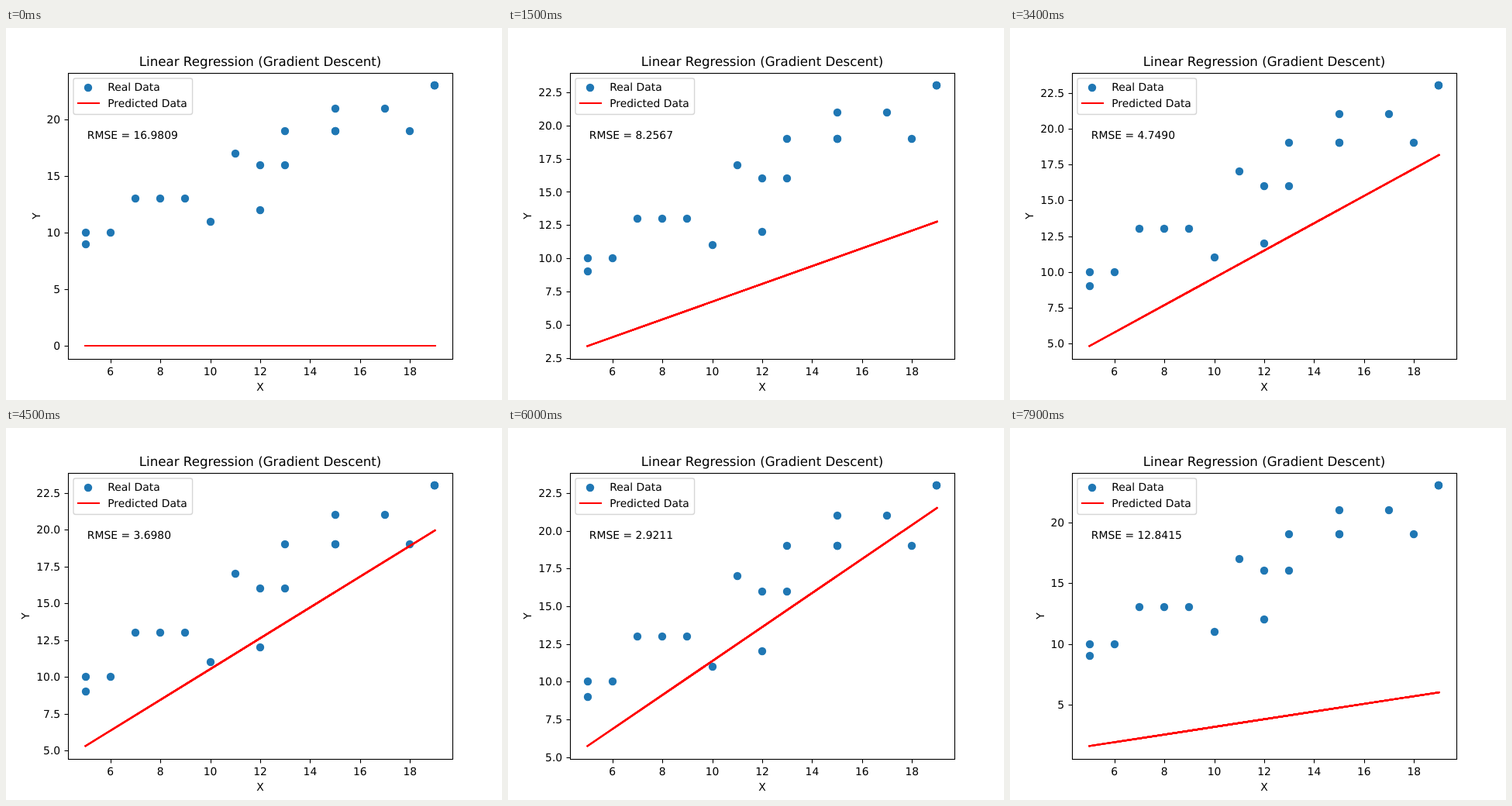
An HTML page that plays this animation: 640x480 px, repeating every 8 s.

```html
<!DOCTYPE html>
<html lang="en">
<head>
<meta charset="utf-8">
<title>Linear Regression</title>
<style>
  html, body { margin: 0; width: 100%; height: 100%; overflow: hidden; background: #fff; }
  svg { display: block; width: 640px; height: 480px; }
  text { font: 13.889px "DejaVu Sans", sans-serif; text-rendering: geometricPrecision; }
  .title { font-size: 16.667px; }
  .mid { text-anchor: middle; }
  .end { text-anchor: end; }
  .axis { fill: none; stroke: #000; stroke-width: 1.11; }
  .dot { fill: #1f77b4; }
  .fit { fill: none; stroke: #f00; stroke-width: 2.083; stroke-linecap: square; }
</style>
</head>
<body>
<svg viewBox="0 0 640 480">
  <g id="dots"></g>
  <g id="fit" class="fit"></g>
  <g id="xAxis"></g>
  <g id="yAxis"></g>
  <rect class="axis" x="80.5" y="58.5" width="496" height="369"/>
  <text class="title mid" x="328" y="49">Linear Regression (Gradient Descent)</text>
  <text class="mid" x="328" y="468">X</text>
  <text id="yLabel" class="mid">Y</text>
  <text id="rmse" x="104.8" y="143"></text>
  <rect x="87" y="65" width="153.6" height="46.5" rx="2.8" fill="#fff" fill-opacity=".8"
        stroke="#ccc" stroke-opacity=".8" stroke-width="1.39"/>
  <circle class="dot" cx="106" cy="77" r="5.2"/>
  <path class="fit" d="M93 97H120"/>
  <text x="131.2" y="81">Real Data</text>
  <text x="131.2" y="102">Predicted Data</text>
</svg>
<script>
const points = [
  [17, 21], [13, 19], [12, 16], [15, 21], [9, 13], [19, 23], [13, 16], [15, 19], [7, 13], [19, 23],
  [10, 11], [5, 10], [18, 19], [8, 13], [15, 19], [6, 10], [19, 23], [11, 17], [5, 9], [12, 12]
];
const rate = 1e-4, loop = 8000, frameTime = 100;
const el = id => document.getElementById(id);
const mean = f => points.reduce((sum, p) => sum + f(p), 0) / points.length;

// Every state of the descent on the mean squared error of y = w x + b.
const states = [];
for (let w = 0, b = 0; states.length < 80;) {
  const err = ([x, y]) => w * x + b - y;
  states.push({ w, b, rmse: Math.sqrt(mean(p => err(p) ** 2)) });
  const dw = 2 * mean(p => err(p) * p[0]);
  const db = 2 * mean(err);
  w -= rate * dw;
  b -= rate * db;
}

// The states play in the alphabetical order of their numbers: 0, 1, 10, 11 ... 19, 2, 20 ...
const order = [...states.keys()].sort();

const toX = x => 80 + (x - 4.3) / 15.4 * 496;
const snap = v => Math.round(v) + 0.5;

function draw({ w, b, rmse }) {
  const line = x => w * x + b;
  const min = Math.min(9, line(5)), max = Math.max(23, line(19));
  const margin = (max - min) * 0.05;
  const low = min - margin, high = max + margin;
  const toY = y => 427.2 - (y - low) / (high - low) * 369.6;
  const fitY = x => w ? toY(line(x)) : Math.round(toY(b));

  el('dots').innerHTML = points.map(([x, y]) =>
    `<circle class="dot" cx="${Math.round(toX(x))}" cy="${Math.round(toY(y))}" r="5.2"/>`).join('');

  // The line visits the points unsorted, so overlapping strokes harden its edges.
  el('fit').innerHTML = points.slice(1).map(([x], i) => {
    const from = points[i][0];
    return `<path d="M${toX(from)} ${fitY(from)}L${toX(x)} ${fitY(x)}"/>`;
  }).join('');

  const step = high - low > 22.5 ? 5 : 2.5;
  let ticks = '';
  for (let v = Math.ceil(low / step) * step; v <= high; v += step) {
    const y = toY(v);
    ticks += `<path class="axis" d="M80.5 ${snap(y)}H75.5"/>` +
      `<text class="end" x="70.2" y="${Math.round(y + 5.06)}">${v.toFixed(step === 5 ? 0 : 1)}</text>`;
  }
  el('yAxis').innerHTML = ticks;
  el('yLabel').setAttribute('transform', `translate(${step === 5 ? 44 : 30} 242.4) rotate(-90)`);
  el('rmse').textContent = `RMSE = ${rmse.toFixed(4)}`;
}

for (let v = 6; v <= 18; v += 2) {
  el('xAxis').innerHTML += `<path class="axis" d="M${snap(toX(v))} 427.5V432.5"/>` +
    `<text class="mid" x="${toX(v)}" y="448">${v}</text>`;
}

let shown = -1;
function tick(now) {
  const index = Math.max(0, Math.floor(now % loop / frameTime) - 1);
  if (index !== shown) draw(states[order[shown = index]]);
  requestAnimationFrame(tick);
}
tick(0);
</script>
</body>
</html>
```
